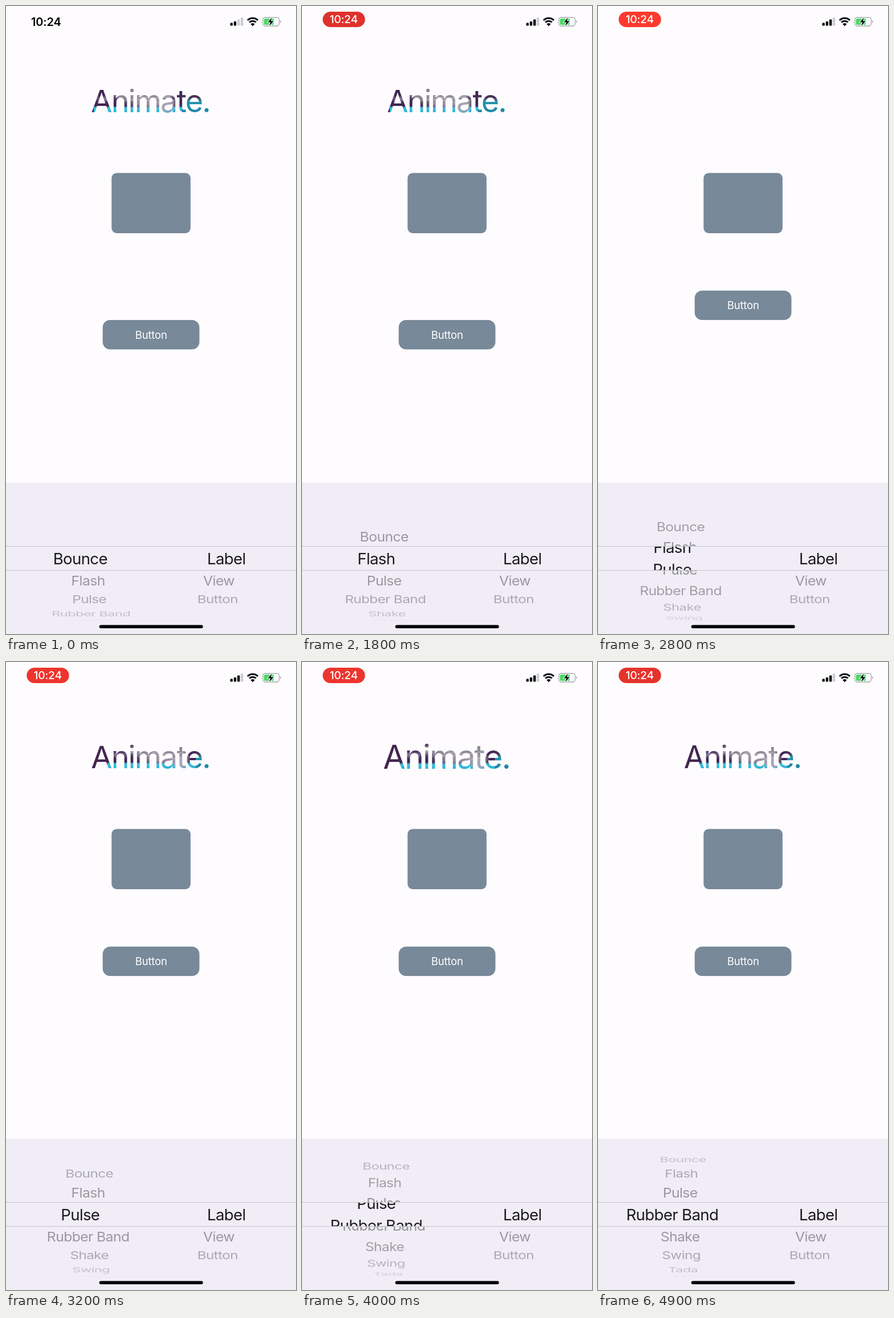
An HTML page for the animation above (5 s loop, 509 by 1100 pixels).

```html
<!DOCTYPE html>
<html lang="en">
<head>
<meta charset="utf-8">
<title>Animate</title>
<style>
  html, body { margin: 0; width: 100%; height: 100%; overflow: hidden; background: #fefcff; }
  svg { display: block; width: 100%; height: 100%; }
  text { font-family: Inter, Roboto, sans-serif; text-anchor: middle; }
  .clock { font-size: 20px; font-weight: 600; letter-spacing: -.01em; }
  .word { font-size: 54px; letter-spacing: -.036em; }
  .caption { font-size: 18.5px; letter-spacing: -.01em; fill: #fff; }
  .row { font-size: 27.7px; letter-spacing: -.025em; fill: #1c1b20; }
</style>
</head>
<body>
<svg viewBox="0 0 509 1100">
  <defs>
    <linearGradient id="dusk" x2="0" y2="1">
      <stop offset="0" stop-color="#2c1a38"/>
      <stop offset=".35" stop-color="#47285a"/>
      <stop offset=".62" stop-color="#41224f"/>
      <stop offset=".67" stop-color="#36c2e4"/>
      <stop offset="1" stop-color="#2494b2"/>
    </linearGradient>
    <linearGradient id="sea" x2="0" y2="1">
      <stop offset="0" stop-color="#3b2449"/>
      <stop offset=".38" stop-color="#4b3459"/>
      <stop offset=".48" stop-color="#2493b0"/>
      <stop offset="1" stop-color="#197d98"/>
    </linearGradient>
    <filter id="soft" x="-30%" y="-30%" width="160%" height="160%"><feGaussianBlur stdDeviation="2.5"/></filter>
    <pattern id="photo" x="100" y="138" width="320" height="60" patternUnits="userSpaceOnUse">
      <rect width="320" height="60" fill="url(#dusk)"/>
      <rect width="54" height="60" fill="#43264f"/>
      <rect x="209" width="111" height="60" fill="url(#sea)"/>
      <g filter="url(#soft)">
        <ellipse cx="142" cy="17" rx="54" ry="13" fill="#8d8997"/>
        <ellipse cx="74" cy="25" rx="15" ry="3" fill="#9a96a4"/>
        <ellipse cx="152" cy="30" rx="46" ry="9" fill="#9692a1"/>
        <ellipse cx="182" cy="38" rx="13" ry="10" fill="#a9a5b4"/>
        <ellipse cx="112" cy="32" rx="14" ry="4" fill="#513c60"/>
      </g>
      <path d="M92 21q22-7 46 0t58-4M110 28q24-5 46 1t40-3" fill="none" stroke="#cbc8d2" stroke-width="1.6" opacity=".6"/>
    </pattern>
    <clipPath id="band"><rect y="947" width="509" height="41.5"/></clipPath>
    <clipPath id="wheel"><path d="M0 835h509v111H0zM0 989h509v87H0z"/></clipPath>
  </defs>

  <rect width="509" height="1100" fill="#fefcff"/>

  <text id="time" class="clock" x="70.3" y="35.2">10:24</text>
  <g id="pill">
    <rect id="pillShape" x="36.3" y="10" width="74.4" height="27" rx="13.5"/>
    <text class="clock" x="73.2" y="30.4" fill="#fff" style="font-size:19.3px;font-weight:500">10:24</text>
  </g>

  <g fill="#08070a">
    <rect x="393.5" y="29.5" width="4.4" height="5" rx="1"/>
    <rect x="399.8" y="27" width="4.4" height="7.5" rx="1"/>
    <rect id="thirdBar" x="406" y="23.6" width="4.4" height="10.9" rx="1"/>
    <rect x="412" y="20" width="4.4" height="14.5" rx="1" fill="#cfccd2"/>
    <path d="M433 35.2l-3.7-3.8a5.3 5.3 0 0 1 7.4 0z"/>
    <path d="M427.2 28.6a8.2 8.2 0 0 1 11.6 0M423.9 25a12.8 12.8 0 0 1 18.2 0" fill="none" stroke="#08070a" stroke-width="2.9"/>
  </g>
  <rect x="450.6" y="20" width="29" height="15" rx="4.5" fill="none" stroke="#a9a7ad" stroke-width="1.3"/>
  <path d="M481 25.3q1.8.7 1.8 2.2t-1.8 2.2z" fill="#a9a7ad"/>
  <rect x="452.6" y="22" width="17.5" height="11" rx="2.6" fill="#4ad964"/>
  <path d="M466.7 20.5l-7.2 8h4.6l-1.6 6.3 7.3-8.2h-4.7z" fill="#08070a" stroke="#fff" stroke-width="1.8" paint-order="stroke"/>

  <g id="title"><text class="word" x="253.6" y="185.6" fill="url(#photo)">Animate.</text></g>

  <rect x="185.3" y="292.4" width="138.6" height="105.5" rx="9" fill="#788999"/>
  <g id="button">
    <rect x="169.7" y="550" width="169.8" height="51.6" rx="13" fill="#788999"/>
    <text class="caption" x="254.7" y="582.8">Button</text>
  </g>

  <rect y="835" width="509" height="265" fill="#f0edf6"/>
  <g id="dim" clip-path="url(#wheel)"></g>
  <g id="bright" clip-path="url(#band)"></g>
  <path d="M0 946.5h509M0 988.7h509" stroke="#c6c3cb"/>
  <rect x="163.7" y="1084.2" width="182" height="5.7" rx="2.85" fill="#050406"/>
</svg>

<script>
const $ = id => document.getElementById(id);
const LOOP = 5000, STEP = 100;
const MID_X = 254.5, MID_Y = 968;
const RADIUS = 110, ROW_ANGLE = 20.3 * Math.PI / 180;

const progress = (t, start, duration) => Math.min(1, Math.max(0, (t - start) / duration));
const ease = p => p * p * (3 - 2 * p);

const scroll = t =>
  ease(progress(t, 1250, 500)) + ease(progress(t, 2500, 600)) + ease(progress(t, 3750, 500));
const flash = t => Math.cos(2 * Math.PI * progress(t, 2050, 1000)) ** 2;
const pulse = t => .2 * Math.sin(Math.PI * progress(t, 3200, 1000)) ** 2;

// Damped spring; the width follows the height a moment later.
function spring(t, start) {
  const s = Math.max(0, t - start);
  return .25 * Math.exp(-s / 250) * Math.sin(2 * Math.PI * s / 320);
}

function addRow(parent, label) {
  const el = document.createElementNS('http://www.w3.org/2000/svg', 'text');
  el.setAttribute('class', 'row');
  el.setAttribute('y', 10);
  el.textContent = label;
  $(parent).append(el);
  return el;
}

const makeColumn = (labels, brightX, dimOffset) => ({
  brightX, dimOffset,
  rows: labels.map(label => ({ dim: addRow('dim', label), bright: addRow('bright', label) }))
});
const effects = makeColumn(
  ['Bounce', 'Flash', 'Pulse', 'Rubber Band', 'Shake', 'Swing', 'Tada', 'Wobble'], 130.3, -111);
const targets = makeColumn(['Label', 'View', 'Button'], 386.7, 119.8);

function place(el, x, y, sx, sy) {
  el.setAttribute('transform', `translate(${x} ${y}) scale(${sx} ${sy})`);
}

function turn(column, position) {
  column.rows.forEach(({ dim, bright }, i) => {
    const angle = (i - position) * ROW_ANGLE;
    const depth = Math.cos(angle);
    const shown = Math.abs(angle) < Math.PI / 2;
    dim.style.display = bright.style.display = shown ? '' : 'none';
    if (!shown) return;
    const y = MID_Y + RADIUS * Math.sin(angle);
    const shrink = 1 - .1 * (1 - depth);
    place(dim, MID_X + column.dimOffset * shrink, y, .9 * shrink, .9 * depth);
    dim.style.opacity = .43 * depth;
    place(bright, column.brightX, y, 1, depth);
  });
}

function draw(t) {
  const recording = t >= 100;
  $('time').style.display = recording ? 'none' : '';
  $('pill').style.display = recording ? '' : 'none';
  const glow = (1 + Math.cos((t - 1200) / 1600 * 2 * Math.PI)) / 2;
  const mix = (low, high) => Math.round(low + (high - low) * glow);
  $('pillShape').setAttribute('fill', `rgb(${mix(218, 255)},${mix(49, 57)},${mix(42, 47)})`);
  $('thirdBar').setAttribute('fill', t < 1300 ? '#cfccd2' : '#08070a');

  const moved = t >= 2000;
  $('button').setAttribute('transform', `translate(0 ${moved ? -51.6 : 0})`);
  $('photo').setAttribute('patternTransform', `translate(${moved ? 24 : 0} 0)`);

  const sx = 1 + pulse(t) + spring(t, 4400);
  const sy = 1 + pulse(t) - spring(t, 4300);
  $('title').style.opacity = flash(t);
  $('title').setAttribute('transform',
    `translate(254 165.5) scale(${sx} ${sy}) translate(-254 -165.5)`);

  turn(effects, scroll(t));
  turn(targets, 0);
}

function tick() {
  draw(Math.floor(performance.now() % LOOP / STEP) * STEP);
  requestAnimationFrame(tick);
}
tick();
</script>
</body>
</html>
```
